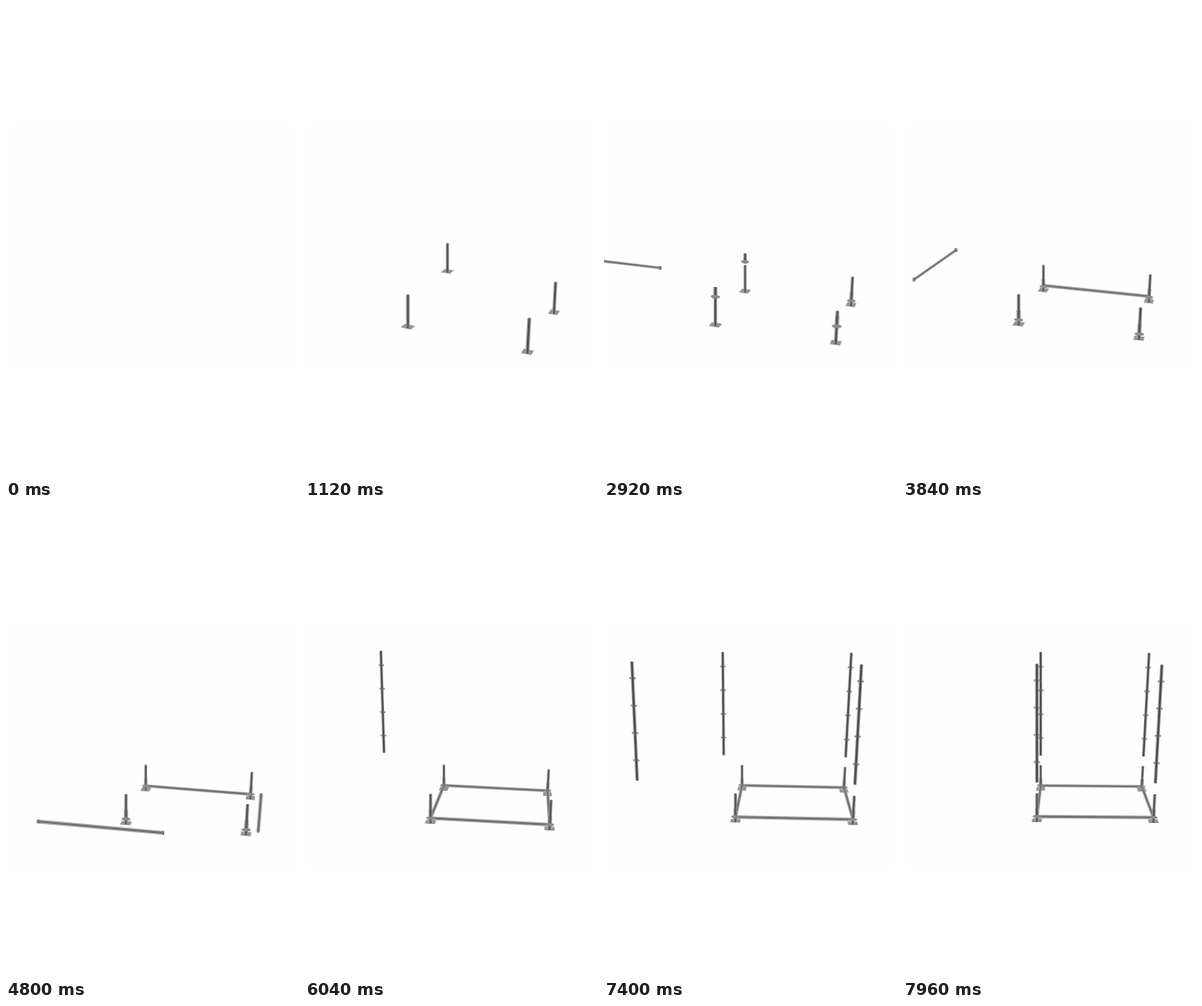
Write an HTML page with a canvas that moves like this. It is 326 by 524 pixels and loops after 8000 ms.

```html
<!DOCTYPE html>
<html lang="en">
<head>
<meta charset="utf-8">
<title>Scaffold assembly</title>
<style>
html, body { margin: 0; width: 100%; height: 100%; overflow: hidden; background: #fff; }
canvas { display: block; width: 326px; height: 524px; }
</style>
</head>
<body>
<canvas id="stage" width="326" height="524"></canvas>
<script>
const LOOP = 8000, STEP = 40;
const ctx = document.getElementById('stage').getContext('2d');

// Corner [x, y, unit height] at three times of the slow camera orbit
const KEYS = [1120, 4800, 7960];
const CORNERS = {
  frontLeft: [[114.5, 356, 35.5], [133.5, 352, 32], [149, 349, 30]],
  backLeft: [[158.5, 319.5, 31], [155.5, 314.5, 27], [153.2, 314, 26.2]],
  backRight: [[277, 340, 33.5], [272, 324, 28.5], [265.5, 315, 26.2]],
  frontRight: [[247.5, 384, 37.5], [267, 364, 33], [278.5, 350, 30]]
};
const SEAT = 0.14; // height of the lowest rosette

// u: left to right, v: front to back
const JACKS = [
  { u: 0, v: 1, drop: 760, slide: 1860, seat: 2780, pole: [6900, 7560] },
  { u: 1, v: 1, drop: 380, slide: 1200, seat: 2500, pole: [5708, 6588] },
  { u: 0, v: 0, drop: 620, slide: 1640, seat: 2735, pole: [7160, 7900] },
  { u: 1, v: 0, drop: 500, slide: 1420, seat: 2650, pole: [6060, 6860] }
];

const mix = (a, b, k) => a + (b - a) * k;
function ease(t, from, to) {
  const k = Math.min(1, Math.max(0, (t - from) / (to - from)));
  return (1 - Math.cos(Math.PI * k)) / 2;
}

function quadratic(t, [a, b, c]) {
  const [p, q, r] = KEYS;
  return a * (t - q) * (t - r) / ((p - q) * (p - r)) +
         b * (t - p) * (t - r) / ((q - p) * (q - r)) +
         c * (t - p) * (t - q) / ((r - p) * (r - q));
}

let view;
function aim(t) {
  view = {};
  for (const name in CORNERS) {
    view[name] = [0, 1, 2].map(i => quadratic(t, CORNERS[name].map(k => k[i])));
  }
}

function project(u, v, z = 0) {
  const [x, y, h] = [0, 1, 2].map(i => mix(
    mix(view.frontLeft[i], view.frontRight[i], u),
    mix(view.backLeft[i], view.backRight[i], u), v));
  return { x: x + 0.055 * u * z * h, y: y - z * h, s: h / 30 };
}

function stroke(a, b, width, color) {
  ctx.lineWidth = width;
  ctx.strokeStyle = color;
  ctx.beginPath();
  ctx.moveTo(a.x, a.y);
  ctx.lineTo(b.x, b.y);
  ctx.stroke();
}

function tube(a, b, width, edge, core) {
  const w = width * (a.s + b.s) / 2;
  stroke(a, b, w, edge);
  stroke(a, b, w * 0.5, core);
}

function rosette(u, v, z, size) {
  const p = project(u, v, z);
  ctx.fillStyle = '#8c8c8c';
  ctx.beginPath();
  ctx.ellipse(p.x, p.y, size * p.s, size * 0.36 * p.s, 0.06, 0, Math.PI * 2);
  ctx.fill();
}

function jack(u, v, z) {
  ctx.fillStyle = '#949494';
  ctx.beginPath();
  for (const [du, dv] of [[-1, -1], [1, -1], [1, 1], [-1, 1]]) {
    const p = project(u + du * 0.042, v + dv * 0.055, z);
    ctx.lineTo(p.x, p.y);
  }
  ctx.fill();
  tube(project(u, v, z - 0.05), project(u, v, z + 1), 3.4, '#999', '#505050');
}

function collar(u, v, z) {
  tube(project(u, v, z - 0.07), project(u, v, z + 0.32), 4, '#949494', '#555');
  rosette(u, v, z, 4.6);
}

function pole(u, v) {
  const z = 1.41, len = 4.38;
  for (let i = 0; i < 4; i++) rosette(u, v, z + len * (0.17 + 0.23 * i), 3.8);
  tube(project(u, v, z), project(u, v, z + len), 3.7, '#949494', '#484848');
}

function bar(u1, v1, u2, v2) {
  const a = project(u1, v1, SEAT), b = project(u2, v2, SEAT);
  tube(a, b, 3.9, '#adadad', '#707070');
  ctx.fillStyle = '#777';
  for (const p of [a, b]) ctx.fillRect(p.x - 1.5, p.y - 2, 3, 4);
}

const slideIn = (t, from, to, start, end) => mix(start, end, ease(t, from, to));

function backBar(t) {
  if (t < 2620) return;
  const u = slideIn(t, 2620, 3620, -2.4, 0);
  const v = 1 + 0.26 * (1 - ease(t, 3620, 3900));
  bar(u, v, u + 1, v);
}

function rightBar(t) {
  if (t < 3640) return;
  const u = slideIn(t, 3640, 4640, -1.4, 1.2) - 0.2 * ease(t, 4640, 4960);
  const away = 0.9 * (1 - ease(t, 3640, 4640));
  bar(u, away, u, 1 + away);
}

function frontBar(t) {
  if (t < 4200) return;
  const u = slideIn(t, 4200, 5200, -1.9, 0);
  const v = -0.3 * (1 - ease(t, 5200, 5480));
  bar(u, v, u + 1, v);
}

function leftBar(t) {
  if (t < 4820) return;
  const u = slideIn(t, 4820, 5500, -1.4, -0.2) + 0.2 * ease(t, 5500, 5760);
  bar(u, 0, u, 1);
}

function post(t, p) {
  if (t >= p.drop) jack(p.u, p.v, 5.5 * (1 - ease(t, p.drop, p.drop + 480)));
  if (t >= p.slide) {
    const u = slideIn(t, p.slide, p.slide + 800, -1.38, p.u);
    collar(u, p.v, SEAT + 1.33 * (1 - ease(t, p.seat, p.seat + 420)));
  }
  if (t >= p.pole[0]) {
    pole(slideIn(t, ...p.pole, p.v ? -1.28 : -1.08, p.u), p.v);
  }
}

function draw(t) {
  ctx.fillStyle = '#fff';
  ctx.fillRect(0, 0, 326, 524);
  ctx.fillStyle = '#fefefe';
  ctx.fillRect(4, 132, 318, 270);
  if (t < 360) return;
  aim(t);
  backBar(t);
  JACKS.slice(0, 2).forEach(p => post(t, p));
  leftBar(t);
  rightBar(t);
  frontBar(t);
  JACKS.slice(2).forEach(p => post(t, p));
}

const begin = performance.now();
function tick() {
  const t = (performance.now() - begin) % LOOP;
  draw(Math.floor(t / STEP) * STEP);
  requestAnimationFrame(tick);
}
tick();
</script>
</body>
</html>
```
